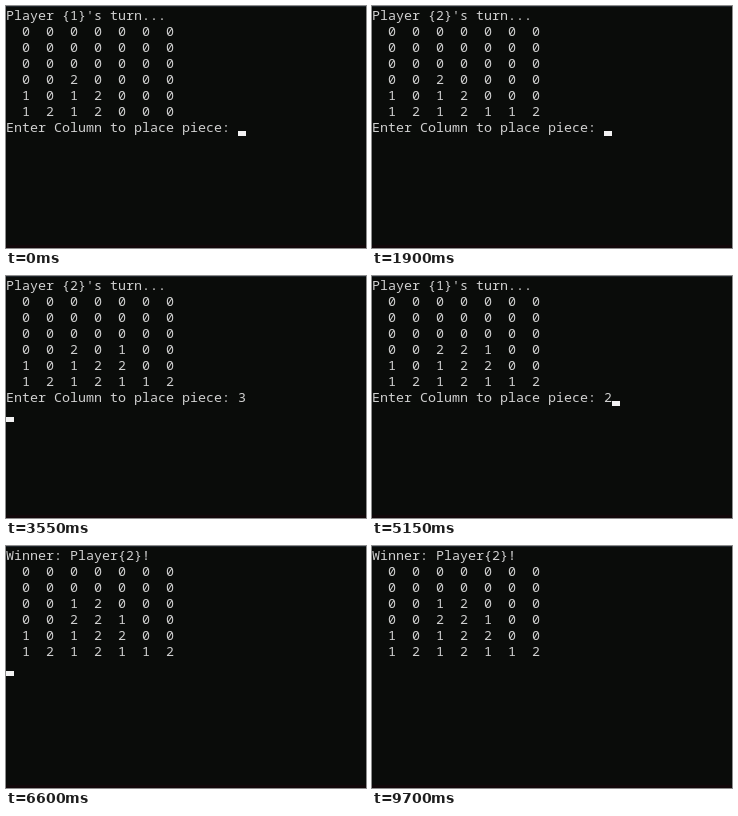
Recreate the animation shown at these times as an HTML page. Size 360 by 242 pixels, loop 9750 ms.

```html
<!DOCTYPE html>
<html lang="en">
<head>
<meta charset="utf-8">
<title>Connect four in a console</title>
<style>
  html, body { margin: 0; width: 100%; height: 100%; overflow: hidden; background: #0a0c0a; }
  body { position: relative; }
  body::before, body::after { content: ""; position: absolute; left: 0; width: 360px; }
  body::before { top: 0; height: 1px; background: #20262c; }
  body::after { top: 239px; height: 3px; background: #12080a; }
  #screen {
    position: absolute; left: 0; top: 1px; margin: 0; color: #d0d0d0;
    font: 13.333px/16px "Noto Sans Mono", monospace;
  }
  #caret { position: absolute; width: 8px; height: 5px; background: #f2f2f2; }
</style>
</head>
<body>
<pre id="screen"></pre>
<div id="caret"></div>
<script>
const LOOP = 9750, BLINK = 460, COLS = 7, ROWS = 6;
const screenEl = document.getElementById("screen");
const caretEl = document.getElementById("caret");

// Columns chosen by the players in turn; the opening is already on the board.
const OPENING = "01230322", PLAYED = "46544323";
const REDRAWS = [550, 1050, 1600, 2350, 3050, 3600, 5350, 6450];
const TYPE_LEAD = 300, ENTER_LEAD = 100;

function boardText(moves) {
  const stacks = Array.from({ length: COLS }, () => []);
  [...moves].forEach((column, i) => stacks[column].push(i % 2 + 1));
  const rows = [];
  for (let y = ROWS - 1; y >= 0; y--) {
    rows.push("  " + stacks.map(stack => stack[y] || 0).join("  "));
  }
  return rows.join("\n");
}

function render(t) {
  const done = REDRAWS.filter(time => t >= time).length;
  const board = boardText(OPENING + PLAYED.slice(0, done));

  let title = "Winner: Player{2}!", prompt = "", x = 0, line = 7;
  let lastEvent = REDRAWS[done - 1] || 0;
  if (done < PLAYED.length) {
    const typed = REDRAWS[done] - TYPE_LEAD, entered = REDRAWS[done] - ENTER_LEAD;
    title = `Player {${done % 2 + 1}}'s turn...`;
    prompt = "Enter Column to place piece: ";
    if (t >= typed) {
      prompt += PLAYED[done];
      lastEvent = typed;
    }
    if (t >= entered) line = 8;
    else x = prompt.length;
  }

  const text = [title, board, prompt].join("\n");
  if (screenEl.textContent !== text) screenEl.textContent = text;
  caretEl.style.left = x * 8 + "px";
  caretEl.style.top = line * 16 + 13 + "px";
  caretEl.hidden = Math.floor((t - lastEvent) / BLINK) % 2 === 1;
}

const begin = performance.now();
function tick() {
  render((performance.now() - begin) % LOOP);
  requestAnimationFrame(tick);
}
tick();
</script>
</body>
</html>
```
